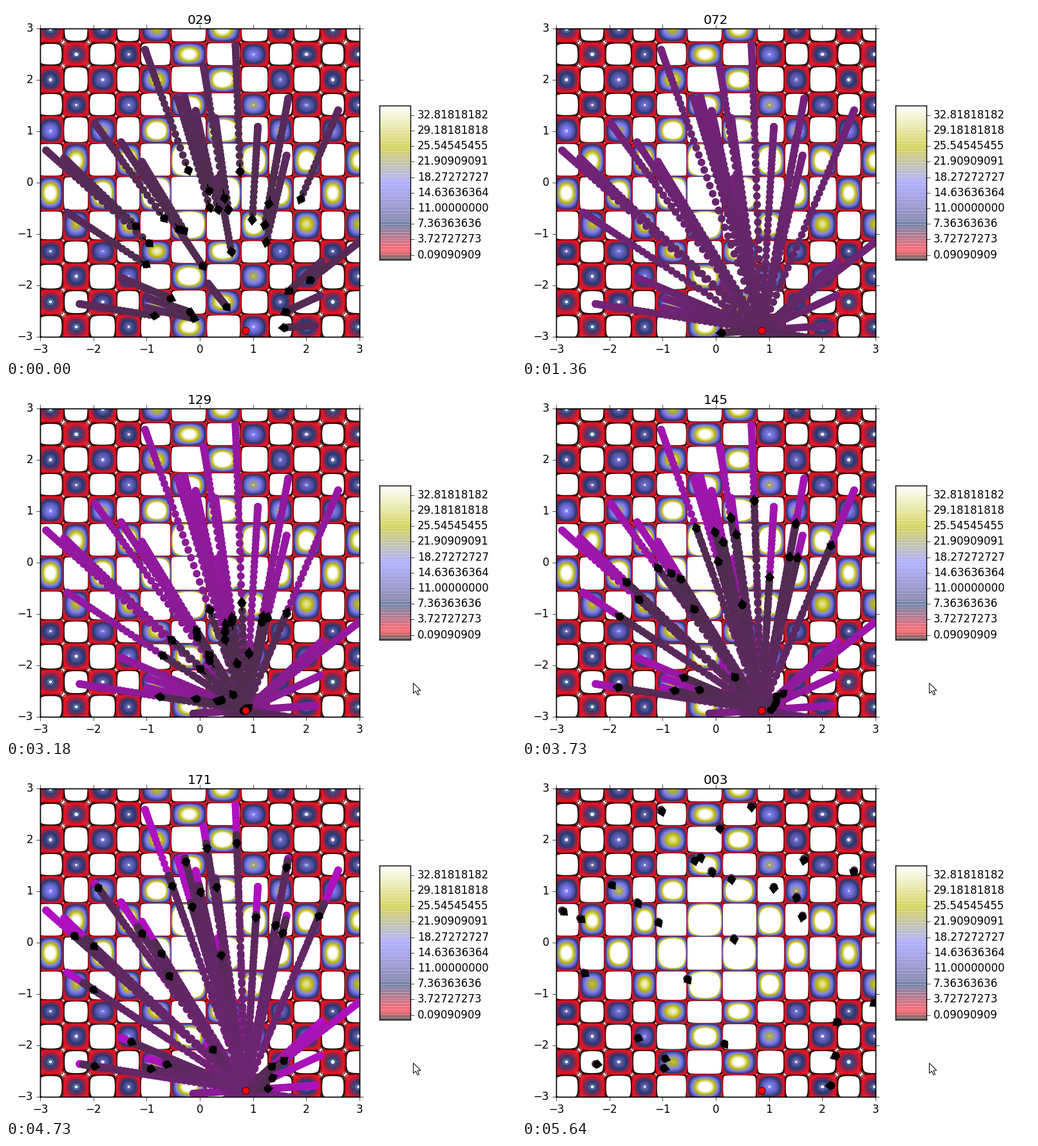
A matplotlib script that plays this animation: 792x548 px, repeating every 5730 ms.

```python
import numpy as np
import matplotlib.pyplot as plt
from matplotlib.animation import FuncAnimation
from matplotlib.patches import Polygon

W, H, DPI = 792, 548, 100
LOOP, TICK = 5730, 30
STEPS = 200

plt.style.use("classic")
plt.rcParams.update({
    "font.family": "DejaVu Sans", "savefig.dpi": "figure",
    "figure.facecolor": "white", "savefig.facecolor": "white",
    "xtick.direction": "out", "ytick.direction": "out",
})


def box(x, y, w, h):
    """Pixel box (from the top left) as a figure rectangle."""
    return [x / W, (H - y - h) / H, w / W, h / H]


PLOT = box(53, 35, 496, 480)
BAR = box(580, 155, 48, 240)


def wave(x):
    return sum(i * np.cos((i + 1) * x + 1) for i in range(1, 6))


def draw_static(fig):
    """Contour field, axes and colour bar."""
    levels = np.linspace(-1, 35, 100)
    grid = np.linspace(-3, 3, 601)
    ax = fig.add_axes(PLOT)
    ax.contour(grid, grid, -np.outer(wave(grid), wave(grid)), levels,
               cmap="gist_stern", linewidths=1)
    ax.set(xlim=(-3, 3), ylim=(-3, 3),
           xticks=range(-3, 4), yticks=range(-3, 4))

    bar = fig.add_axes(BAR)
    colors = plt.get_cmap("gist_stern")(np.linspace(0, 1, len(levels)))
    bar.hlines(levels, 0, 1, colors=colors, linewidth=1).set_snap(False)
    bar.set(xlim=(0, 1), ylim=(-1, 35), xticks=[])
    bar.yaxis.tick_right()
    bar.set_yticks(levels[3::10], [f"{v:.8f}" for v in levels[3::10]])


# Where the swarm starts, and the point it is drawn to.
START = np.array([
    (-1.03, 2.59), (.67, 2.68), (.07, 2.26), (-.41, 1.63), (-.29, 1.68),
    (-.08, 1.4), (.29, 1.26), (1.66, 1.64), (2.6, 1.41), (1.09, 1.09),
    (1.52, .9), (1.63, .53), (-1.97, 1.15), (-1.48, .79), (-1.09, .41),
    (-2.89, .63), (-2.55, .48), (.34, .09), (-2.49, -.58), (-.54, -.7),
    (2.99, -1.16), (2.29, -1.53), (2.26, -2.2), (2.17, -2.78),
    (.15, -1.96), (-1.48, -1.85), (-2.26, -2.36), (-.97, -2.25),
    (-.99, -2.44),
])
GOAL = np.array([.86, -2.87])
COUNT = len(START)


def swarm_paths():
    """Fall to the goal and past it, then swing back out and in again."""
    rng = np.random.default_rng(4)
    offset = START - GOAL
    t = np.arange(STEPS)[:, None]

    fall = np.cos(rng.normal(.034, .0012, COUNT) * t)
    fall = np.where(fall < 0, .75 * fall, fall)

    # Those far to the right come back later and less far.
    late = offset[:, 0] > offset[:, 1]
    reach = np.where(late, .35, .92) * rng.normal(1, .08, COUNT)
    peak = np.where(late, 180, 163) + rng.normal(0, 3, COUNT)
    back = reach * np.cos(.033 * (t - peak))

    ratio = np.where(t < 98, fall, back)
    return GOAL + offset * ratio[:, :, None]


# Milliseconds, pictures shown so far, step on the counter.
KEYS = np.array([
    (0, 0, 29), (90, 1, 33), (540, 1.05, 33), (550, 2, 50), (1360, 7, 72),
    (2180, 13, 96), (3180, 20, 129), (4180, 27, 157), (5360, 35, 195),
    (5640, 38, 203),
]).T


def step_at(ms):
    """The step on show: the picture holds, then skips some steps."""
    shot = np.floor(np.interp(ms, KEYS[0], KEYS[1]) + .4)
    return int(round(np.interp(shot, KEYS[1], KEYS[2]))) % STEPS


fig = plt.figure(figsize=(W / DPI, H / DPI), dpi=DPI)

# The contours are slow to stroke: draw them once and keep the picture.
draw_static(fig)
fig.canvas.draw()
backdrop = np.asarray(fig.canvas.buffer_rgba()).copy()
fig.clear()

stage = fig.add_axes([0, 0, 1, 1])
stage.imshow(backdrop, extent=(0, W, H, 0), aspect="auto",
             interpolation="nearest")
stage.set_axis_off()
POINTER = np.array([(0, 0), (0, 16), (4, 12.5), (6.5, 18.5), (9, 17.5),
                    (6.5, 11.5), (11.5, 11.5)])
pointer = stage.add_patch(Polygon(POINTER + (632.5, 462.5),
                                  fc="white", ec="black", lw=.72))

ax = fig.add_axes(PLOT)
ax.patch.set_visible(False)
ax.set(xlim=(-3, 3), ylim=(-3, 3), xticks=[], yticks=[])
title = ax.set_title("", y=1.0)

path = swarm_paths()
trail = ax.scatter([], [], s=72, linewidths=0, zorder=2)
arrows = ax.quiver(START[:, 0], START[:, 1], np.ones(COUNT), np.ones(COUNT),
                   units="dots", scale_units="dots", scale=1, width=2,
                   headwidth=8, headlength=5, headaxislength=5,
                   minshaft=1, minlength=0, color="black", zorder=3)
dots, = ax.plot([], [], "o", color="black", ms=8, zorder=4)
ax.plot(*GOAL, "o", color="red", ms=8, mew=.5, zorder=5)

NEW, OLD = np.array([78, 45, 78]) / 255, np.array([196, 10, 217]) / 255
UNIT_PX = np.array([496, 480]) / 6
HEAD = 10


def update(frame):
    ms = frame * TICK
    n = step_at(ms)
    title.set_text(f"{n:03d}")
    pointer.set_visible(ms >= 2000)

    age = np.repeat(n - np.arange(n + 1), COUNT)[:, None] / 195
    trail.set_offsets(path[:n + 1].reshape(-1, 2))
    trail.set_facecolors(np.clip(NEW + (OLD - NEW) * age, 0, 1))

    # Each arrow runs from the last place to just past the current one.
    now, prev = path[n], path[max(n - 1, 0)]
    move = (path[max(n, 1)] - path[max(n - 1, 0)]) * UNIT_PX
    heading = move / np.linalg.norm(move, axis=1)[:, None]
    shaft = (now - prev) * UNIT_PX + heading * HEAD
    arrows.set_offsets(prev)
    arrows.set_UVC(shaft[:, 0], shaft[:, 1])
    dots.set_data(now[:, 0], now[:, 1])
    return trail, arrows, dots, title, pointer


anim = FuncAnimation(fig, update, frames=LOOP // TICK, interval=TICK,
                     repeat=True, repeat_delay=0, blit=False)
plt.show()
```
